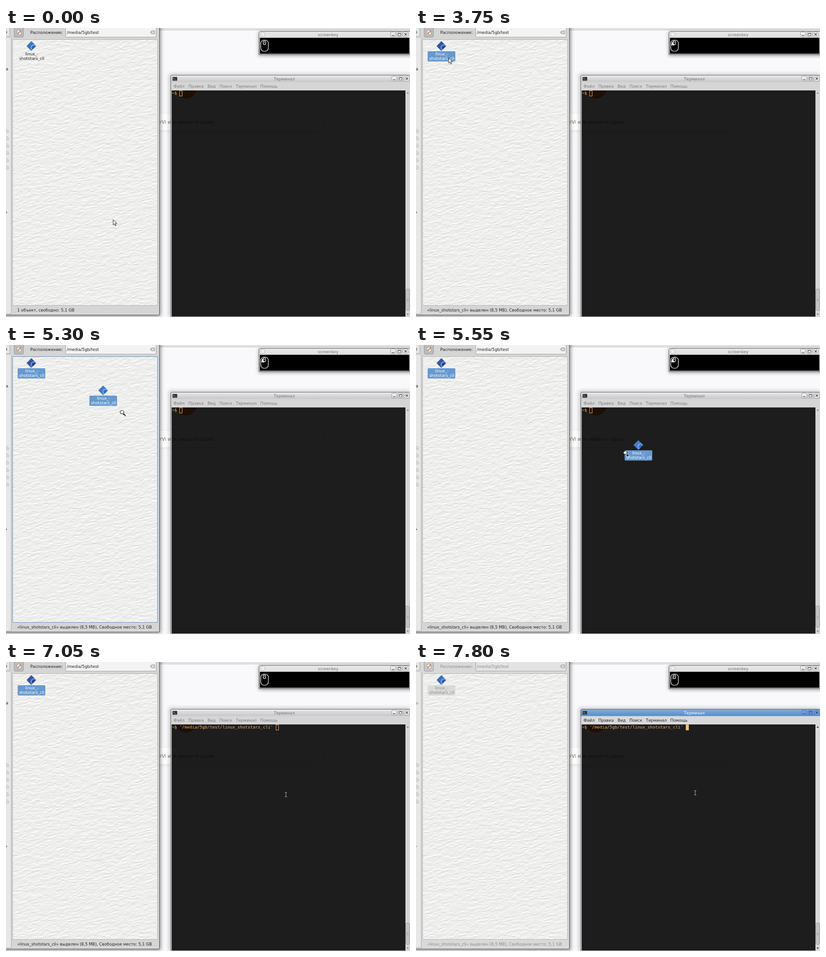
Recreate the animation shown at these times as an HTML page with a canvas. Size 884x634 px, loop 8 s.

```html
<!DOCTYPE html>
<html lang="ru">
<head>
<meta charset="utf-8">
<title>Drag a file into the terminal</title>
<style>
html, body { margin: 0; width: 100%; height: 100%; overflow: hidden; background: #f9f9fb; }
svg, canvas { position: absolute; left: 0; top: 0; display: block; }
#paper { left: 14px; top: 25px; }
text { font: 8.85px "DejaVu Sans", sans-serif; white-space: pre; }
.status { font-size: 8.77px; }
.mid { text-anchor: middle; }
.mono { font: 9.2px "DejaVu Sans Mono", monospace; fill: #f7b968; }
.box { fill: var(--box, #ececec); stroke: var(--edge, #9a9a9a); }
.glyph { fill: none; stroke: var(--glyph, #555); }

.anim, .focus { animation: 8s step-end infinite; }
/* --a before the terminal takes the focus, --b after */
.focus { fill: var(--a); animation-name: focus; }
.ink { --a: #222; --b: #8c8c8c; }
.panel { --a: #d5d5d5; --b: #d9d9d9; }
.menu { --a: #7e7e7e; --b: #222; }
@keyframes focus {
  0% { fill: var(--a); }
  92.5% { fill: color-mix(in srgb, var(--a), var(--b)); }
  97.5%, 100% { fill: var(--b); }
}

#press { animation-name: press; }
@keyframes press {
  0% { opacity: 0; }
  2.5% { opacity: 1; }
  5% { opacity: .92; animation-timing-function: steps(13, start); }
  13.75% { opacity: .08; }
  15.625% { opacity: 0; }
  46.875% { opacity: 1; }
  49.375% { opacity: .8; }
  52.5% { opacity: .55; }
  55.625% { opacity: .3; }
  58.75% { opacity: .05; }
  63.125% { opacity: 1; }
  80% { opacity: .7; }
  83.75% { opacity: .35; }
  88.125% { opacity: 0; }
  92.5% { opacity: 1; }
  97.5%, 100% { opacity: .2; }
}
#arrow { animation-name: arrow; }
@keyframes arrow {
  0% { transform: translate(234.5px, 420.5px); }
  9.375% { transform: translate(234.5px, 419.5px); }
  46.875% { transform: translate(71.5px, 65.5px); }
  49.375% { transform: translate(66.5px, 66.5px); }
  52.5% { transform: translate(49.5px, 62.5px); }
  63.125% { transform: translate(53.5px, 62px); opacity: 1; }
  66.25%, 100% { opacity: 0; }
}
#ghost { animation-name: ghost; }
@keyframes ghost {
  0% { opacity: 0; }
  66.25% { opacity: 1; transform: translate(157px, 60px); }
  69.375% { opacity: 1; transform: translate(431px, 180px); }
  73.125% { opacity: 1; transform: translate(561px, 228px); }
  80%, 100% { opacity: 0; }
}
#hand { animation-name: hand; }
@keyframes hand {
  0% { opacity: 0; }
  66.25% { opacity: 1; transform: translate(254px, 147px); }
  69.375% { opacity: 1; transform: translate(458px, 236px); }
  73.125% { opacity: 1; transform: translate(612.5px, 290px); }
  80%, 100% { opacity: 0; }
}
#overView, #moveMark { animation-name: overView; }
@keyframes overView { 0% { opacity: 0; } 66.25% { opacity: 1; } 69.375%, 100% { opacity: 0; } }
#overTerm { animation-name: overTerm; }
@keyframes overTerm { 0% { opacity: 0; } 69.375%, 100% { opacity: 1; } }
#ibeam { animation-name: ibeam; }
@keyframes ibeam {
  0% { opacity: 0; }
  80% { opacity: 1; transform: translate(612.5px, 291px); }
  92.5% { opacity: 1; transform: translate(612px, 289px); }
  97.5%, 100% { opacity: 1; transform: translate(611px, 287px); }
}
#plate { animation-name: plate; }
@keyframes plate {
  0% { fill: transparent; }
  46.875% { fill: #6699cf; }
  92.5% { fill: #a0bad4; }
  97.5%, 100% { fill: #dadad9; }
}
#label { animation-name: label; }
@keyframes label {
  0% { fill: #222; }
  46.875% { fill: #fff; }
  92.5% { fill: #c4c4c4; }
  97.5%, 100% { fill: #8b8b8b; }
}
#file { animation-name: file; }
@keyframes file { 0% { color: #1d68c4; } 46.875% { color: #123f97; } 92.5%, 100% { color: #1d5fb4; } }
#idle { animation-name: idle; }
@keyframes idle { 0% { opacity: 1; } 46.875%, 100% { opacity: 0; } }
#chosen { animation-name: chosen; }
@keyframes chosen { 0% { opacity: 0; } 46.875%, 100% { opacity: 1; } }
#typed { animation-name: typed; }
@keyframes typed { 0% { opacity: 0; } 80%, 100% { opacity: 1; } }
#caret { animation-name: caret; }
@keyframes caret {
  0% { fill: transparent; transform: none; }
  80% { fill: transparent; transform: translateX(211px); }
  92.5%, 100% { fill: #ffc170; transform: translateX(211px); }
}
#activeTitle { animation-name: activeTitle; --box: #6d9fd4; --edge: #4a7bb3; --glyph: #2f4f75; }
@keyframes activeTitle { 0% { opacity: 0; } 92.5%, 100% { opacity: 1; } }
</style>
</head>
<body>
<svg width="884" height="634">
  <defs>
    <filter id="soft" x="-10%" y="-10%" width="120%" height="120%"><feGaussianBlur stdDeviation="4"/></filter>
  </defs>
  <path fill="#f9f9fb" d="M0 0h884v634H0z"/>
  <path fill="#e2e2e2" d="M336 0h548v4H336z"/>
  <path fill="#c9c9c9" d="M336 4h548v1H336z"/>
  <circle cx="394" cy="131" r="23.500" fill="#ff8030"/>
  <rect x="300" y="190" width="391" height="36" rx="4" opacity=".08" filter="url(#soft)"/>
  <rect x="300" y="188" width="391" height="36" rx="4" fill="#fff"/>
  <text x="336.500" y="209.500" fill="#6f6f78" style="font-size:10.3px">rVi или введите адрес</text>
  <rect x="-20" y="-10" width="358" height="642" opacity=".5" filter="url(#soft)"/>
  <path d="M360 634V104H884" fill="none" stroke="#000" stroke-width="6" opacity=".25" filter="url(#soft)"/>
  <rect x="553" y="9" width="350" height="52" opacity=".35" filter="url(#soft)"/>
</svg>
<canvas id="paper" width="318" height="584"></canvas>
<svg width="884" height="634">
  <defs>
    <linearGradient id="silver" x2="0" y2="1"><stop stop-color="#e9e9e9"/><stop offset="1" stop-color="#c6c6c6"/></linearGradient>
    <linearGradient id="azure" x2="0" y2="1"><stop stop-color="#82afdd"/><stop offset="1" stop-color="#568bc5"/></linearGradient>
    <linearGradient id="sheen" x2="1" y2="1"><stop stop-color="#fff" stop-opacity=".25"/><stop offset="1" stop-color="#003" stop-opacity=".2"/></linearGradient>
    <clipPath id="diamond"><path d="M55.500 29 66 39.500 55.500 50 45 39.500z"/></clipPath>
    <g id="icon">
      <rect x="-7.500" y="-7.500" width="15" height="15" rx="1" transform="translate(55.500 39.500) rotate(45)" fill="currentColor"/>
      <g clip-path="url(#diamond)">
        <path d="M45 29h21v21H45z" fill="url(#sheen)"/>
        <g fill="none" stroke="#a9cdf5" opacity=".7">
          <circle cx="61" cy="43" r="5.500" stroke-width="1.500"/>
          <circle cx="61" cy="43" r="7" stroke-width="1.800" stroke-dasharray="1.600 1.600"/>
        </g>
      </g>
    </g>
    <g id="name">
      <text class="mid" x="56.500" y="59.800">linux_-</text>
      <text class="mid" x="56.500" y="70.200">shotstars_cli</text>
    </g>
    <g id="buttons">
      <g class="box">
        <rect x="-5.500" y="-5.500" width="11" height="11" rx="2"/>
        <rect x="8.500" y="-5.500" width="11" height="11" rx="2"/>
        <rect x="22" y="-5.500" width="11" height="11" rx="2"/>
      </g>
      <g class="glyph">
        <path d="M-3 2.500h6" stroke-width="1.500"/>
        <path d="M11 -2.500h6v5.500h-6zM11 -1.800h6"/>
        <path d="M25 -2.500l5 5m0-5l-5 5" stroke-width="1.500"/>
      </g>
    </g>
    <path id="drive" d="M-1 4 1 .500H3.500L5.500 4V7.500H-1zM-1 4.500H5.500" fill="#e2e2e2" stroke="#b6b6b6" stroke-width=".900"/>
    <path id="bar" d="M-2.500-5H-1L0-4.200 1-5H2.500M0-4.200V4.200M-2.500 5H-1L0 4.200 1 5H2.500" fill="none"/>
    <path id="titleBar" d="M360.500 119V107q0-3.500 3.500-3.500H890V118.500H360.500z"/>
  </defs>

  <!-- file manager -->
  <path class="focus panel" fill-rule="evenodd" d="M0 0H335V629H0zM14 25V609H332V25z"/>
  <path d="M335.500 0V629.500H0" fill="none" stroke="#565656"/>
  <path d="M334 0V628H0" fill="none" stroke="#e4e4e4"/>
  <path d="M0 22h11v605H0z" fill="#e7e7e7"/>
  <path d="M11.500 22V627H0" fill="none" stroke="#aaa"/>
  <rect x="14.500" y="25.500" width="317" height="583" fill="none" stroke="#b4b4b4"/>
  <rect id="overView" class="anim" x="14.500" y="25.500" width="317" height="583" fill="none" stroke="#5c92cd"/>
  <path d="M0 -1H8.500V19H0" fill="#e4e4e4" stroke="#a3a3a3"/>
  <path d="M0 7l2 2-2 3" fill="none" stroke="#777" stroke-width="1.500"/>
  <rect class="focus" style="--a:#bcbcbc;--b:#cacaca" x="18" y="-3" width="20" height="23" rx="2.500" stroke="#909090"/>
  <path d="M24.500 5h8v9.500h-8z" fill="#fff" stroke="#999"/>
  <path d="M27 11.500 32.500 5.500" stroke="#dd7d2a" stroke-width="2.200"/>
  <path d="M26 12.600 27.200 11.400" stroke="#333" stroke-width="1.500"/>
  <text class="focus ink" x="53" y="12.500">Расположение:</text>
  <rect class="focus" style="--a:#f3f3f3;--b:#e3e3e3" x="130.500" y="-6" width="198" height="26" rx="2" stroke="#a0a0a0"/>
  <text class="focus ink" x="133" y="12.500">/media/5gb/test</text>
  <path d="M315 9.500 318.500 5.500H326V13.500H318.500z" fill="#b4b4b4"/>
  <path d="M319.500 7.500l4 4m0-4l-4 4" stroke="#f3f3f3" stroke-width="1.200"/>
  <text class="focus ink" x="-.500" y="93">а</text>
  <text class="focus ink" x="-2.500" y="406">ь</text>
  <use href="#drive" y="222"/><use href="#drive" y="238"/><use href="#drive" y="254"/>
  <use href="#drive" y="270"/><use href="#drive" y="286"/><use href="#drive" y="302"/>
  <g id="idle" class="anim"><text class="focus ink status" x="24.500" y="621.500">1 объект, свободно: 5,1 GB</text></g>
  <g id="chosen" class="anim"><text class="focus ink status" x="24.500" y="621.500">«linux_shotstars_cli» выделен (8,5 MB), Свободное место: 5,1 GB</text></g>
  <g id="file" class="anim"><use href="#icon"/></g>
  <rect id="plate" class="anim" x="25.500" y="51" width="60.500" height="22.500" rx="2"/>
  <g id="label" class="anim"><use href="#name"/></g>

  <!-- key display -->
  <path d="M553.500 58.500V11q0-3.500 3.500-3.500H890V58.500z" fill="url(#silver)" stroke="#606060"/>
  <path d="M555.500 21.500h327v35h-327z"/>
  <rect x="557.500" y="9.500" width="9" height="9" rx="1" fill="#eee" stroke="#bbb"/>
  <text class="mid" x="705" y="17.500" fill="#747474">screenkey</text>
  <use href="#buttons" x="847" y="14"/>
  <path id="press" class="anim" d="M565 28.500Q559 29 559 38H565.500V37Q563 36 563 32.500 563 29 565.500 28.500z" fill="#fff"/>
  <g fill="none" stroke="#fff" stroke-width="1.200">
    <rect x="557.500" y="26.500" width="16.500" height="24.500" rx="7"/>
    <rect x="562.800" y="28" width="5.400" height="8.500" rx="2.700"/>
    <path d="M565.500 30v3" stroke-width="1"/>
  </g>

  <!-- terminal -->
  <path d="M362 137h512v496H362z" fill-opacity=".888"/>
  <path class="focus panel" d="M361 118h523v19H361z"/>
  <path class="focus panel" d="M360 119h2.500v515H360zM874 137h10v497H874zM360 633h524v1H360z"/>
  <use href="#titleBar" fill="url(#silver)"/>
  <use href="#buttons" x="849.500" y="111"/>
  <g id="activeTitle" class="anim">
    <use href="#titleBar" fill="url(#azure)"/>
    <use href="#buttons" x="849.500" y="111"/>
  </g>
  <path d="M360.500 634V107q0-3.500 3.500-3.500H884" fill="none" stroke="#626262"/>
  <rect x="364.500" y="107.500" width="10" height="8" rx="1" fill="#2b2f2f" stroke="#777"/>
  <path d="M366.500 109.500l2 1.500-2 1.500M369.500 113h2" fill="none" stroke="#eee" stroke-width=".800"/>
  <text class="mid focus" style="--a:#747474;--b:#fff" x="609" y="114.500">Терминал</text>
  <g class="focus menu">
    <text x="366.500" y="130.500">Файл</text>
    <text x="399" y="130.500">Правка</text>
    <text x="441" y="130.500">Вид</text>
    <text x="467" y="130.500">Поиск</text>
    <text x="503" y="130.500">Терминал</text>
    <text x="556.500" y="130.500">Помощь</text>
  </g>
  <rect x="875" y="572.500" width="8" height="47" rx="3" fill="#c3c3c3" stroke="#979797"/>
  <path d="M877 594.500h4m-4 2h4m-4 2h4" stroke="#999" stroke-width=".800"/>
  <path class="focus menu" d="M876.500 144 879 141 881.500 144zM876.500 626.500h5L879 629.500z"/>
  <text class="mono" x="363" y="146.300">~$ </text>
  <g id="typed" class="anim"><text class="mono" x="379.600" y="146.300">'/media/5gb/test/linux_shotstars_cli'</text></g>
  <rect id="caret" class="anim" x="379.800" y="137.800" width="5.600" height="11.400" stroke="#ffc170" stroke-width=".900"/>

  <!-- dragged file and pointers -->
  <g id="ghost" class="anim" color="#2873cf">
    <use href="#icon"/>
    <rect x="25.500" y="51" width="60.500" height="22.500" rx="2" fill="#6699cf"/>
    <g fill="#fff"><use href="#name"/></g>
  </g>
  <path id="arrow" class="anim" d="M0 0V11.500L2.700 9 4.700 13.500 6.500 12.700 4.600 8.300H8z" fill="#fff" stroke="#000" stroke-width=".900"/>
  <g id="hand" class="anim">
    <path d="M-3 3.500-4.500 0Q-4.500-2-3-1.500-2.500-4-.500-3.200 1.500-4 2-2.500 4-2.500 4 0L3 3.500z" fill="#fff" stroke="#000"/>
    <g id="moveMark" class="anim"><path d="M2 3.500H6.500L5.300 4.700 8.500 8 7 9.500 3.700 6 2 7.700z" stroke="#fff" stroke-width=".500"/></g>
    <g id="overTerm" class="anim"><path d="M5 2.500v7M1.500 6h7" stroke="#fff" stroke-width="3"/><path d="M5 3v6M2 6h6" stroke="#000" stroke-width="1.400"/></g>
  </g>
  <g id="ibeam" class="anim">
    <use href="#bar" stroke="#000" stroke-width="2.400"/>
    <use href="#bar" stroke="#ddd"/>
  </g>
</svg>
<script>
// Embossed paper: fine slanted ripples lit from above.
const paper = document.getElementById('paper');
const { width, height } = paper;
const pen = paper.getContext('2d');
const image = pen.createImageData(width, height);

const hash = (x, y) => {
  const s = Math.sin(x * 127.1 + y * 311.7) * 43758.5453;
  return s - Math.floor(s);
};
const ease = t => t * t * (3 - 2 * t);
const mix = (a, b, t) => a + (b - a) * t;

function noise(x, y) {
  const i = Math.floor(x), j = Math.floor(y), u = ease(x - i), v = ease(y - j);
  return mix(mix(hash(i, j), hash(i + 1, j), u), mix(hash(i, j + 1), hash(i + 1, j + 1), u), v);
}
function relief(x, y) {
  const row = y + x * .22 + 4 * noise(x * .08, y * .08);
  return noise(x * .11, row * .3) + .5 * noise(x * .24 + 40, row * .55);
}

for (let x = 0; x < width; x++) {
  let above = relief(x, -1);
  for (let y = 0; y < height; y++) {
    const here = relief(x, y);
    const shade = 238 + (here - above) * 46;
    image.data.set([shade, shade, shade - 2, 255], (y * width + x) * 4);
    above = here;
  }
}
pen.putImageData(image, 0, 0);
</script>
</body>
</html>
```
